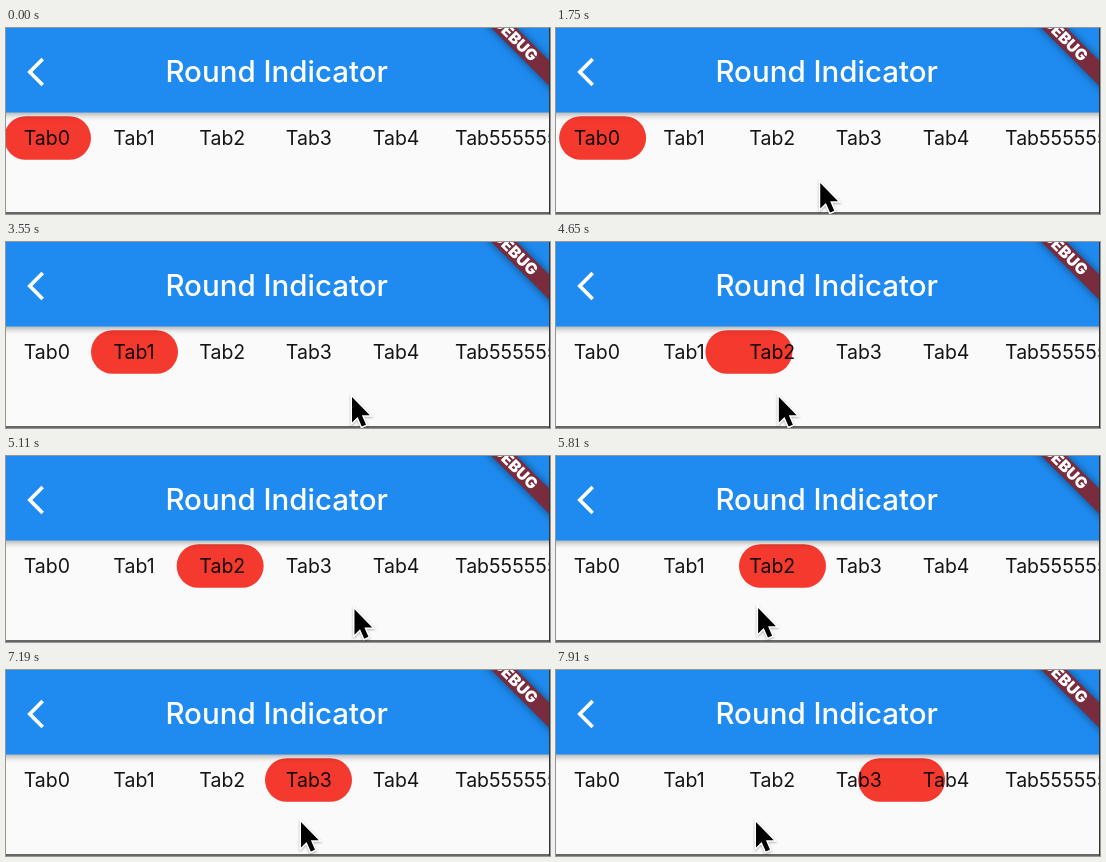
An HTML page for the animation above (8 s loop, 544 by 186 pixels).

```html
<!DOCTYPE html>
<html lang="en">
<head>
<meta charset="utf-8">
<title>Round tab indicator</title>
<style>
  html, body { margin: 0; height: 100%; overflow: hidden; background: #fafafa; }
  svg { display: block; width: 544px; height: 186px; font-family: Inter, sans-serif; }
  .tabs { font-size: 19.5px; fill: #000; fill-opacity: .92; }
  .title { font-size: 29.5px; font-weight: 500; fill: #fff; text-anchor: middle; }
  .debug { font-size: 15.8px; font-weight: 900; fill: #fff; text-anchor: end; }
  .bar { fill: #1f8bf0; filter: drop-shadow(0 2px 3px rgba(0, 0, 0, .35)); }
  .banner { stroke: #782c3e; stroke-width: 17.8; filter: drop-shadow(0 0 4px rgba(0, 0, 0, .5)); }
  #cursor { filter: drop-shadow(0 1px 1px rgba(0, 0, 0, .3)); }
</style>
</head>
<body>
<svg viewBox="0 0 544 186">
  <rect width="544" height="186" fill="#fafafa"/>
  <rect id="pill" y="88.2" width="87" height="43.6" rx="21.8" fill="#f4392e"/>
  <g class="tabs">
    <text x="17.7" y="117">Tab0</text>
    <text x="107.3" y="117">Tab1</text>
    <text x="193.3" y="117">Tab2</text>
    <text x="279.8" y="117">Tab3</text>
    <text x="366.8" y="117">Tab4</text>
    <text x="449" y="117">Tab5555555</text>
  </g>
  <rect class="bar" x="-10" y="-10" width="564" height="94.5"/>
  <path d="M36.7 31 23.8 44 36.7 57" fill="none" stroke="#fff" stroke-width="3.7"/>
  <text class="title" x="270.7" y="54">Round Indicator</text>
  <path class="banner" d="M468-30 572 74"/>
  <text class="debug" transform="translate(529 30.5) rotate(45)" y="5.5">DEBUG</text>
  <rect y="184" width="544" height="2" fill="#666"/>
  <rect x="543" width="1" height="186" fill="#333"/>
  <path id="cursor" d="M1 3V28.5L6.6 23 10.8 32.5 15 30.7 10.9 21.3H18.8Z"
        stroke="#fff" stroke-width="3" paint-order="stroke"/>
</svg>
<script>
const LOOP = 8000, SETTLE = 1000;
const PULL = 0.3;                     // share of a page dragged before release
const FIRST_TAB = -2, TAB_STEP = 87;
const pill = document.getElementById('pill');
const cursor = document.getElementById('cursor');

// Each swipe turns one page; the pointer drags from one x to another
const swipes = [
  { grab: 1590, release: 2410, from: 374, to: 184 },
  { grab: 3830, release: 4260, from: 345, to: 151 },
  { grab: 5630, release: 6060, from: 360, to: 181 },
  { grab: 7350, release: 7760, from: 294, to: 199 }
];

const mix = (a, b, k) => a + (b - a) * k;
const ramp = (t, start, end) => Math.min(1, Math.max(0, (t - start) / (end - start)));
const easeOut = (k, power) => 1 - (1 - k) ** power;
const smooth = k => k * k * (3 - 2 * k);

function pose(t) {
  const index = swipes.findLastIndex(swipe => t >= swipe.grab);
  if (index < 0) return { page: 0, x: swipes[0].from };
  const { grab, release, from, to } = swipes[index];
  const drag = ramp(t, grab, release);
  const settle = ramp(t, release, release + SETTLE);
  const next = swipes[index + 1]?.from ?? to;
  return {
    page: index + mix(PULL * drag, 1, easeOut(settle, 2)),
    x: mix(mix(from, to, easeOut(drag, 4)), next, smooth(settle))
  };
}

function draw() {
  const t = performance.now() % LOOP;
  const { page, x } = pose(t);
  const y = 188 - 36 * ramp(t, 730, 1310) - 3 * ramp(t, 4650, 5400);
  pill.setAttribute('x', FIRST_TAB + TAB_STEP * page);
  cursor.setAttribute('transform', `translate(${x} ${y})`);
  requestAnimationFrame(draw);
}
draw();
</script>
</body>
</html>
```
